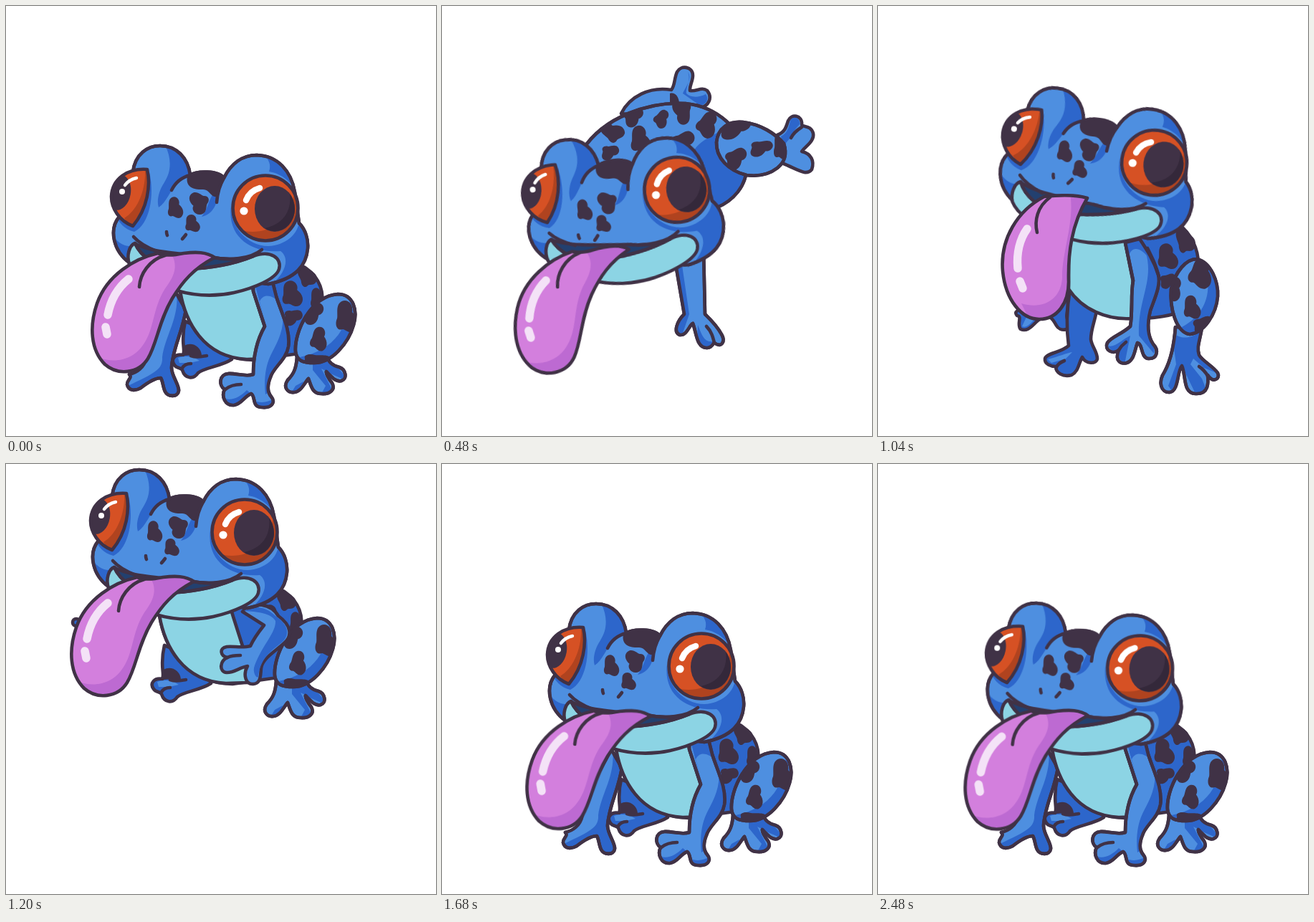
Write an HTML page without scripts that moves like this. It is 600 px wide and 600 px high and loops after 2560 ms.

```html
<!DOCTYPE html>
<html lang="en">
<head>
<meta charset="utf-8">
<title>Hopping frog</title>
<style>
html, body { margin: 0; width: 100%; height: 100%; overflow: hidden; background: #fff; }
svg { display: block; width: 100vw; height: 100vh; }
.ink { fill: none; }
.ink, .line, .sky, .deep, .belly { stroke: #403246; stroke-width: 4.6; stroke-linejoin: round; stroke-linecap: round; }
.line { fill: none; }
.sky, .lit { fill: #4e8fe0; }
.deep, .shade { fill: #2d66cb; }
.belly { fill: #8cd4e4; }
.spot { fill: #403246; }
.gloss { fill: none; stroke: #f4e2f7; stroke-width: 11.5; stroke-linecap: round; }
.glint { fill: none; stroke: #fff; stroke-linecap: round; }

/* One step lasts 80 ms = 3.125 % */
.head, .face, .sway, .sit, .rear, .dive, .arm, .tuck, .torso, .thigh, .tongue {
  animation: 2560ms step-end -8ms infinite;
}
.head { animation-name: head; transform-origin: 212px 345px; }
.face { animation-name: face; }
.sway { animation-name: sway; transform-origin: 240px 350px; }
.sit { animation-name: sit; }
.rear { animation-name: rear; }
.dive { animation-name: dive; }
.arm { animation-name: arm; transform-origin: 0 560px; }
.tuck { animation-name: tuck; }
.torso { animation-name: torso; }
.thigh { animation-name: thigh; }
.tongue { animation-name: tongue; }

@keyframes head {
  0%, 34.375%, 68.75%, 84.375%, 31.25%, 65.625% { transform: none; }
  3.125%, 37.5% { transform: translate(7px, -22px) rotate(3deg); }
  6.25%, 40.625% { transform: translate(17px, -82px) rotate(7deg); }
  9.375%, 43.75% { transform: translate(-4px, -137px) rotate(5deg); }
  12.5%, 46.875% { transform: translate(-29px, -187px); }
  15.625%, 50% { transform: translate(-27px, -100px) rotate(-4deg); }
  18.75%, 53.125% { transform: translate(-26px, -9px) rotate(-6.5deg); }
  21.875%, 56.25% { transform: translate(-10px, 54px) rotate(-6.5deg); }
  25%, 59.375% { transform: translate(7px, 66px) rotate(-2deg); }
  28.125%, 62.5% { transform: translate(5.5px, 28.5px); }
  71.875%, 87.5% { transform: translate(1px, -6px); }
  75%, 90.625% { transform: translate(2px, -12px) rotate(.5deg); }
  78.125%, 93.75% { transform: translate(2px, -7px) rotate(1.2deg); }
  81.25%, 96.875% { transform: translate(2px, -1px) rotate(1.5deg); }
}
@keyframes face {
  0%, 6.25%, 12.5%, 28.125%, 40.625%, 46.875%, 62.5% { transform: none; }
  15.625%, 25%, 50%, 59.375% { transform: translate(-3px, 7px); }
  18.75%, 53.125% { transform: translate(-6px, 14px); }
}
@keyframes sway {
  0%, 6.25%, 34.375%, 40.625%, 68.75%, 84.375% { transform: none; }
  3.125%, 37.5% { transform: rotate(-7deg); }
  12.5%, 46.875% { transform: none; }
  18.75%, 53.125% { transform: translate(-5px, 6px); }
  25%, 59.375% { transform: translateY(14px); }
  28.125%, 62.5% { transform: rotate(2.5deg) scaleX(1.04); }
  31.25%, 65.625% { transform: rotate(1deg); }
  71.875%, 87.5% { transform: rotate(8deg); }
  75%, 90.625% { transform: rotate(16deg); }
  78.125%, 93.75% { transform: rotate(6deg); }
  81.25%, 96.875% { transform: rotate(-1.2deg); }
}
@keyframes sit {
  0%, 25%, 34.375%, 59.375% { opacity: 1; transform: none; }
  6.25%, 15.625%, 40.625%, 50% { opacity: 0; }
  12.5%, 46.875% { opacity: 1; transform: translate(-29px, -187px); }
}
@keyframes rear {
  0%, 12.5%, 46.875% { opacity: 0; }
  6.25%, 40.625% { opacity: 1; transform: none; }
  9.375%, 43.75% { opacity: 1; transform: translate(-21px, -55px); }
}
@keyframes dive {
  0%, 25%, 59.375% { opacity: 0; }
  15.625%, 50% { opacity: 1; transform: translate(2px, -92px); }
  18.75%, 53.125% { opacity: 1; transform: none; }
  21.875%, 56.25% { opacity: 1; transform: translate(16px, 63px); }
}
@keyframes arm {
  0%, 15.625%, 31.25%, 50%, 65.625% { opacity: 1; transform: none; }
  12.5%, 46.875% { opacity: 0; }
  25%, 59.375% { transform: skewX(-4deg) scaleY(.86); }
  28.125%, 62.5% { transform: skewX(-2.5deg) scaleY(.93); }
}
@keyframes tuck {
  0%, 15.625%, 50% { opacity: 0; }
  12.5%, 46.875% { opacity: 1; }
}
@keyframes torso {
  0%, 31.25%, 65.625% { transform: none; }
  25%, 59.375% { transform: translate(4px, 26px); }
  28.125%, 62.5% { transform: translate(2px, 13px); }
}
@keyframes thigh {
  0%, 31.25%, 65.625% { transform: none; }
  25%, 59.375% { transform: translate(12px, 4px); }
  28.125%, 62.5% { transform: translate(7px, 2px); }
}
@keyframes tongue {
  0%, 12.5%, 46.875% { opacity: 1; }
  6.25%, 40.625% { opacity: 0; }
}
</style>
</head>
<body>
<svg viewBox="0 0 600 600">
<defs>
  <path id="spot" d="M-5-14C2-17 8-10 6-4 13 1 15 9 9 14 3 17-1 12-4 12-10 14-13 8-10 2-9-2-12-11-5-14Z"/>
  <path id="skull" d="M177 232C180 206 198 195 215 195 238 195 254 212 257 236 266 230 296 229 304 240 314 220 330 208 350 208 379 209 398 230 403 260L409 303C418 312 422 326 421 338 419 362 405 380 366 388L240 372 172 358C150 342 143 312 158 294 150 270 158 240 177 232Z"/>
  <path id="sideEye" d="M197 228C202 250 198 282 177 307 158 300 147 282 147 266 148 241 170 226 197 228Z"/>
  <circle id="frontEye" cx="362" cy="282" r="45.5"/>
  <path id="lick" d="M212 345C180 352 141 375 127 415 116 447 118 480 138 500 156 516 185 513 198 492 211 470 213 440 232 408 246 385 262 366 291 351 280 343 265 343 248 345 234 348 222 349 212 345Z"/>
  <path id="droop" d="M232 266C195 285 170 325 174 370 178 410 200 437 225 437 250 437 266 415 266 385 265 345 270 305 292 268 275 263 250 264 232 266Z"/>
  <path id="sitThigh" d="M404 482C402 455 425 405 463 402 485 402 491 425 485 445 478 470 455 498 430 498 415 498 405 495 404 482Z"/>
  <path id="sitFoot" d="M406 490C405 505 402 513 393 522 386 532 393 540 402 539 412 538 417 525 422 520 426 530 427 541 440 541 452 542 460 535 455 526 450 520 446 512 447 510 455 518 460 525 468 523 477 520 474 507 465 504 455 502 450 497 447 488Z"/>
  <path id="sitArm" d="M345 398L361 447C349 468 345 490 345 514 335 518 320 512 310 513 298 514 296 529 305 535 300 545 306 558 318 557 329 555 332 545 342 541 349 545 342 560 358 560 372 561 376 552 370 545 364 538 365 528 369 518 373 504 391 494 394 475 397 452 385 430 377 405L372 385 345 385Z"/>
  <path id="farArm" d="M236 398C220 430 203 455 196 490 193 505 182 512 172 514 177 519 169 521 169 528 171 538 181 537 188 533 197 526 207 519 216 519 219 524 219 532 222 538 226 546 240 546 241 537 242 529 231 516 231 505 232 480 246 455 251 424Z"/>
  <path id="rearThigh" d="M409 395C415 370 430 353 445 353 465 358 475 385 474 405 472 430 455 456 435 458 415 455 407 420 409 395Z"/>
  <path id="rearFoot" d="M415 448C413 475 408 495 400 510 390 525 395 540 407 539 420 537 417 510 424 502 430 515 425 541 443 541 462 542 461 525 460 515 468 527 478 520 474 512 468 503 452 495 448 487 444 475 450 465 452 448Z"/>
  <path id="rearArm" d="M345 330L356 383C352 405 356 425 352 447 340 458 325 462 320 470 315 480 328 487 336 480 330 495 338 500 347 498 358 494 358 480 362 470 370 472 366 490 377 492 390 493 392 480 384 472 376 460 375 445 380 425 385 410 395 390 391 375 385 355 375 340 365 325Z"/>
  <path id="diveBody" d="M196 201C226 154 290 133 340 136 380 140 424 170 425 222 426 252 405 272 384 281L300 330 210 260Z"/>
  <path id="diveThigh" d="M383 190C385 170 400 160 420 162 445 165 465 178 477 192 482 208 478 218 468 226 455 236 440 238 425 236 400 230 382 212 383 190Z"/>
  <path id="diveArm" d="M326 360L338 430C328 440 322 455 332 459 342 460 345 445 350 443 355 455 355 478 370 477 378 476 378 470 380 470 390 478 396 468 390 458 383 445 372 435 367 430L365 340Z"/>
  <clipPath id="inSkull"><use href="#skull"/></clipPath>
  <clipPath id="inSideEye"><use href="#sideEye"/></clipPath>
  <clipPath id="inFrontEye"><use href="#frontEye"/></clipPath>
  <clipPath id="inLick"><use href="#lick"/></clipPath>
  <clipPath id="inDroop"><use href="#droop"/></clipPath>
  <clipPath id="inSitThigh"><use href="#sitThigh"/></clipPath>
  <clipPath id="inSitFoot"><use href="#sitFoot"/></clipPath>
  <clipPath id="inSitArm"><use href="#sitArm"/></clipPath>
  <clipPath id="inFarArm"><use href="#farArm"/></clipPath>
  <clipPath id="inRearThigh"><use href="#rearThigh"/></clipPath>
  <clipPath id="inRearFoot"><use href="#rearFoot"/></clipPath>
  <clipPath id="inRearArm"><use href="#rearArm"/></clipPath>
  <clipPath id="inDiveBody"><use href="#diveBody"/></clipPath>
  <clipPath id="inDiveThigh"><use href="#diveThigh"/></clipPath>
  <clipPath id="inDiveArm"><use href="#diveArm"/></clipPath>
</defs>

<g class="sit">
  <g class="tuck"><circle class="deep" cx="127" cy="408" r="5"/></g>
  <path class="deep" d="M250 440C243 470 251 480 247 487 236 485 229 493 235 501 238 506 244 504 246 508 250 521 262 521 268 512 275 505 300 503 315 493L300 460Z"/>
  <path class="lit" d="M240 491C250 487 262 489 270 495L256 498 242 498Z"/>
  <path class="spot" d="M249 474C259 468 272 475 273 487 265 490 256 486 249 488Z"/>
  <path class="line" d="M258 488C266 491 273 489 280 488M246 505C249 500 254 499 258 499"/>
  <g class="arm">
    <use href="#farArm" class="deep"/>
    <path class="lit" clip-path="url(#inFarArm)" d="M238 400C242 435 222 460 218 490 219 507 208 512 170 530L165 512 195 480Z"/>
    <use href="#farArm" class="ink"/>
  </g>
  <g class="torso">
    <path class="deep" d="M250 380L345 375 412 362C432 372 444 392 441 415 440 450 430 480 415 484L345 494C275 492 250 440 243 398Z"/>
    <path class="belly" d="M243 380L340 380 346 400 361 447 366 492 336 493C275 490 250 440 243 398Z"/>
    <g class="spot">
      <use href="#spot" transform="translate(419 376) scale(.95 1.1) rotate(-30)"/>
      <use href="#spot" transform="translate(399 401) scale(1.2)"/>
      <use href="#spot" transform="translate(434 408) scale(.8 1)"/>
      <use href="#spot" transform="translate(401 434) rotate(80) scale(.9)"/>
    </g>
  </g>
  <use href="#sitFoot" class="sky"/>
  <path class="shade" clip-path="url(#inSitFoot)" d="M428 495H455L480 525 455 514 440 506 460 545H438L446 530 428 508ZM395 545L404 530 415 524 412 545Z"/>
  <use href="#sitFoot" class="ink"/>
  <g class="thigh">
    <use href="#sitThigh" class="sky"/>
    <g clip-path="url(#inSitThigh)">
      <path class="shade" d="M480 400C481 445 460 480 410 490V505H495Z"/>
      <g class="spot">
        <use href="#spot" transform="translate(475 433) scale(1.3 1.5)"/>
        <use href="#spot" transform="translate(437 464) rotate(15) scale(1 1.1)"/>
        <use href="#spot" transform="translate(434 496) rotate(90) scale(.9 1.4)"/>
        <use href="#spot" transform="translate(429 428) rotate(60) scale(1.1)"/>
      </g>
    </g>
    <use href="#sitThigh" class="ink"/>
  </g>
  <g class="arm">
    <use href="#sitArm" class="sky"/>
    <g clip-path="url(#inSitArm)" class="shade">
      <path d="M345 380H375V408C365 402 358 404 354 412L361 440Z"/>
      <path d="M385 420C391 450 378 470 369 488 361 505 360 525 362 542L380 530 400 490V440Z"/>
      <path d="M300 545C312 553 325 547 336 536L342 541 325 562H300ZM345 550C355 555 365 553 374 548V565H345Z"/>
    </g>
    <use href="#sitArm" class="ink"/>
    <path class="line" d="M306 535C312 530 320 528 328 528"/>
  </g>
  <g class="tuck" transform="translate(29 187)">
    <path class="sky" d="M330 206L360 225C352 235 345 245 341 254 330 257 318 254 308 255 297 257 299 268 309 270 298 275 297 290 308 291 320 291 325 284 337 282 330 295 335 308 345 307 356 306 355 295 356 285 357 272 375 262 388 250 400 240 398 225 380 212 370 195 345 190 330 206Z"/>
    <path class="shade" d="M332 205C350 206 370 208 376 219 377 235 358 252 347 281 343 291 350 300 352 297 354 275 366 263 385 249 397 238 394 224 376 212 362 198 345 197 332 205Z"/>
    <path class="line" d="M309 270C315 267 320 267 327 267"/>
  </g>
</g>

<g class="rear" opacity="0">
  <path class="deep" d="M218 418C203 421 187 424 194 432 202 433 193 444 199 451 211 456 218 441 226 437 240 430 243 435 249 446 254 455 269 453 268 443 258 432 268 424 264 410Z"/>
  <path class="lit" d="M201 447C209 451 216 438 222 434L208 432Z"/>
  <path class="deep" d="M268 395C262 430 264 460 266 474 255 484 235 484 233 492 232 500 242 503 248 503 248 512 258 518 270 515 280 510 280 498 285 490 290 500 305 500 306 492 306 482 298 475 297 465 297 450 303 440 306 420Z"/>
  <path class="lit" d="M237 493C252 489 264 484 271 483L262 492 242 498Z"/>
  <path class="line" d="M249 504C251 499 255 497 260 495"/>
  <path class="deep" d="M268 310L345 315 418 303C438 318 447 340 447 360L425 426C400 435 370 437 352 436 320 437 285 422 268 395Z"/>
  <path class="belly" d="M266 310L340 315 345 330 356 385 353 436C320 438 285 424 266 395Z"/>
  <g class="spot">
    <use href="#spot" transform="translate(428 326) scale(1 1.3) rotate(-25)"/>
    <use href="#spot" transform="translate(404 349) scale(1.2)"/>
    <use href="#spot" transform="translate(405 383) rotate(70) scale(.8)"/>
  </g>
  <use href="#rearFoot" class="sky"/>
  <path class="shade" clip-path="url(#inRearFoot)" d="M410 455C425 468 440 463 455 450V490L480 515 455 505 440 492 436 500 452 520 462 545H445L424 502 412 540 405 530 416 500Z"/>
  <use href="#rearFoot" class="ink"/>
  <path class="line" d="M448 503C454 507 457 511 460 516"/>
  <use href="#rearThigh" class="sky"/>
  <g clip-path="url(#inRearThigh)">
    <path class="shade" d="M450 350C470 390 462 430 420 450V465H480V350Z"/>
    <g class="spot">
      <use href="#spot" transform="translate(451 372) scale(1.4) rotate(20)"/>
      <use href="#spot" transform="translate(438 420) scale(1 1.1)"/>
      <use href="#spot" transform="translate(454 445) rotate(65)"/>
      <use href="#spot" transform="translate(413 394) scale(1 1.1) rotate(30)"/>
    </g>
  </g>
  <use href="#rearThigh" class="ink"/>
  <use href="#rearArm" class="sky"/>
  <g clip-path="url(#inRearArm)" class="shade">
    <path d="M345 320H378V352C365 334 352 336 350 350Z"/>
    <path d="M374 345C385 385 362 410 364 460L385 485 397 375 380 338Z"/>
    <path d="M320 474C330 478 342 464 352 460L344 500Z"/>
  </g>
  <use href="#rearArm" class="ink"/>
  <path class="line" d="M376 338C383 352 388 362 392 378M336 480C339 475 342 472 346 469"/>
</g>

<g class="dive" opacity="0">
  <path class="sky" d="M250 150C262 126 290 112 320 117 325 112 324 100 328 92 333 82 350 84 350 97 350 105 345 112 346 118 355 120 362 112 370 118 378 128 372 140 360 142L320 155Z"/>
  <path class="shade" d="M343 92C350 102 340 112 336 122L360 139C369 137 373 130 368 123 356 129 346 127 341 122 340 112 348 105 343 92Z"/>
  <path class="spot" d="M318 122C327 119 332 130 331 140H318Z"/>
  <use href="#diveArm" class="sky"/>
  <g clip-path="url(#inDiveArm)" class="shade">
    <path d="M324 355H334L345 430 334 462H322L336 425Z"/>
    <path d="M357 445C363 460 366 470 378 468L376 482H355Z"/>
  </g>
  <use href="#diveArm" class="ink"/>
  <path class="line" d="M369 447C376 454 378 462 380 470"/>
  <use href="#diveBody" class="sky"/>
  <g clip-path="url(#inDiveBody)">
    <path class="shade" d="M402 165C385 180 345 190 350 215L375 290 440 270V180Z"/>
    <g class="spot">
      <use href="#spot" transform="translate(237 175) rotate(-50) scale(1.1)"/>
      <use href="#spot" transform="translate(268 154) rotate(60)"/>
      <use href="#spot" transform="translate(277 186) scale(1.2 1.3)"/>
      <use href="#spot" transform="translate(307 157) rotate(40) scale(.85)"/>
      <use href="#spot" transform="translate(335 148) rotate(180) scale(1.1 1.2)"/>
      <use href="#spot" transform="translate(371 165) rotate(35) scale(1.2)"/>
      <use href="#spot" transform="translate(337 190) rotate(60) scale(1.2)"/>
      <use href="#spot" transform="translate(235 204) rotate(80) scale(.85)"/>
    </g>
  </g>
  <use href="#diveBody" class="ink"/>
  <path class="sky" d="M468 180C478 176 480 170 483 160 487 150 503 152 502 165 502 170 515 165 518 178 520 188 508 195 502 203 515 206 520 216 516 228 508 238 497 228 474 219Z"/>
  <path class="shade" d="M486 160C489 153 500 155 499 165 493 172 488 178 485 185L476 196 473 182C481 178 484 170 486 160Z"/>
  <path class="line" d="M487 184C490 178 494 174 502 169"/>
  <use href="#diveThigh" class="sky"/>
  <g clip-path="url(#inDiveThigh)" class="spot">
    <use href="#spot" transform="translate(410 170) rotate(75) scale(1.1 1.5)"/>
    <use href="#spot" transform="translate(411 212) rotate(60) scale(1.1)"/>
    <use href="#spot" transform="translate(446 198) rotate(80) scale(.9 1.1)"/>
    <use href="#spot" transform="translate(473 195) scale(.9 1.3)"/>
  </g>
  <use href="#diveThigh" class="ink"/>
</g>

<g class="head">
  <use href="#skull" class="sky"/>
  <g clip-path="url(#inSkull)">
    <g class="shade">
      <path d="M222 194C232 215 230 232 221 246 213 258 210 272 213 281 224 274 229 257 240 246L262 235 250 200Z"/>
      <path d="M200 232C208 265 200 305 179 315 165 312 158 302 153 292L177 307Z"/>
      <path d="M357 206C368 214 370 222 367 231 385 234 400 246 408 265L412 240 390 205Z"/>
      <path d="M314 278C312 305 335 335 366 335 390 334 408 318 409 300L432 320 420 380 366 392C390 375 397 352 383 342 345 345 308 325 314 278Z"/>
      <path d="M296 258C296 275 289 291 273 294 282 283 282 270 292 258Z"/>
      <path d="M145 310C150 328 165 338 178 334L172 362 145 345Z"/>
    </g>
    <path class="spot" d="M253 238C262 227 296 227 306 240L294 266C286 268 284 255 274 256 262 257 250 252 253 238Z"/>
  </g>
  <use href="#skull" class="ink"/>
  <path class="line" d="M231 257C236 247 245 239 257 236M294 274C295 261 298 250 304 240"/>
  <g class="face">
    <g class="spot">
      <use href="#spot" transform="translate(236 281) scale(.9 1)"/>
      <use href="#spot" transform="translate(269 276) rotate(190) scale(1.15 1)"/>
      <use href="#spot" transform="translate(260 303) scale(.87 .82)"/>
    </g>
    <path class="line" d="M224 315Q224 318 225 320M251 319Q248 323 246 325"/>
  </g>

  <path class="belly" d="M172 360C168 348 172 334 180 331 186 345 210 372 250 367 285 366 318 360 345 349 370 340 385 352 381 367 377 381 345 394 318 400 290 406 262 404 238 397 205 390 180 375 172 360Z"/>
  <path class="ink" style="fill:#23406f" d="M180 331C195 342 240 346 285 350 312 356 335 352 345 349 318 360 285 366 250 367 210 372 186 345 180 331Z"/>
  <path class="line" d="M178 322C184 329 194 336 212 343M285 350C312 356 341 353 357 340"/>

  <use href="#sideEye" fill="#d65124"/>
  <g clip-path="url(#inSideEye)">
    <path fill="#b0431f" d="M194 225C196 255 184 285 165 296L176 312 205 290V225Z"/>
    <ellipse class="spot" cx="157" cy="260" rx="17" ry="25" transform="rotate(10 157 260)"/>
  </g>
  <use href="#sideEye" class="ink"/>
  <path class="glint" stroke-width="4.5" d="M166 250Q172 242 182 240"/>
  <circle cx="162" cy="259" r="4" fill="#fff"/>

  <use href="#frontEye" fill="#d65124"/>
  <g clip-path="url(#inFrontEye)">
    <path fill="#b0431f" d="M325 312C355 322 398 308 402 258L415 300 365 335Z"/>
    <ellipse class="spot" cx="375" cy="283" rx="28" ry="32"/>
    <path fill="#34283a" d="M396 262C399 288 385 305 361 310 382 323 403 304 403 283Q402 270 396 262Z"/>
  </g>
  <use href="#frontEye" class="ink"/>
  <path class="glint" stroke-width="8.5" d="M335 271Q340 258 354 254"/>
  <circle cx="332" cy="286" r="5.6" fill="#fff"/>

  <g class="tongue"><g class="sway">
    <use href="#lick" fill="#d37fdd"/>
    <path clip-path="url(#inLick)" fill="#bd6ad2" d="M230 345C240 360 236 375 225 390 206 415 207 447 195 467 179 496 150 499 128 490L150 520 215 500 300 350 270 335Z"/>
    <use href="#lick" class="ink"/>
    <path class="line" d="M222 348C200 354 187 374 186 392"/>
    <path class="gloss" d="M171 381C156 393 146 410 142 431M139 448L141 458"/>
  </g></g>
</g>

<g class="rear" opacity="0">
  <use href="#droop" fill="#d37fdd"/>
  <path clip-path="url(#inDroop)" fill="#bd6ad2" d="M268 262C275 300 256 345 257 380 255 410 230 424 200 415L215 445H270L300 260Z"/>
  <use href="#droop" class="ink"/>
  <path class="line" d="M240 267C222 280 218 300 222 316"/>
  <path class="gloss" d="M208 311C198 325 193 345 195 366M198 384L202 394"/>
</g>
</svg>
</body>
</html>
```
